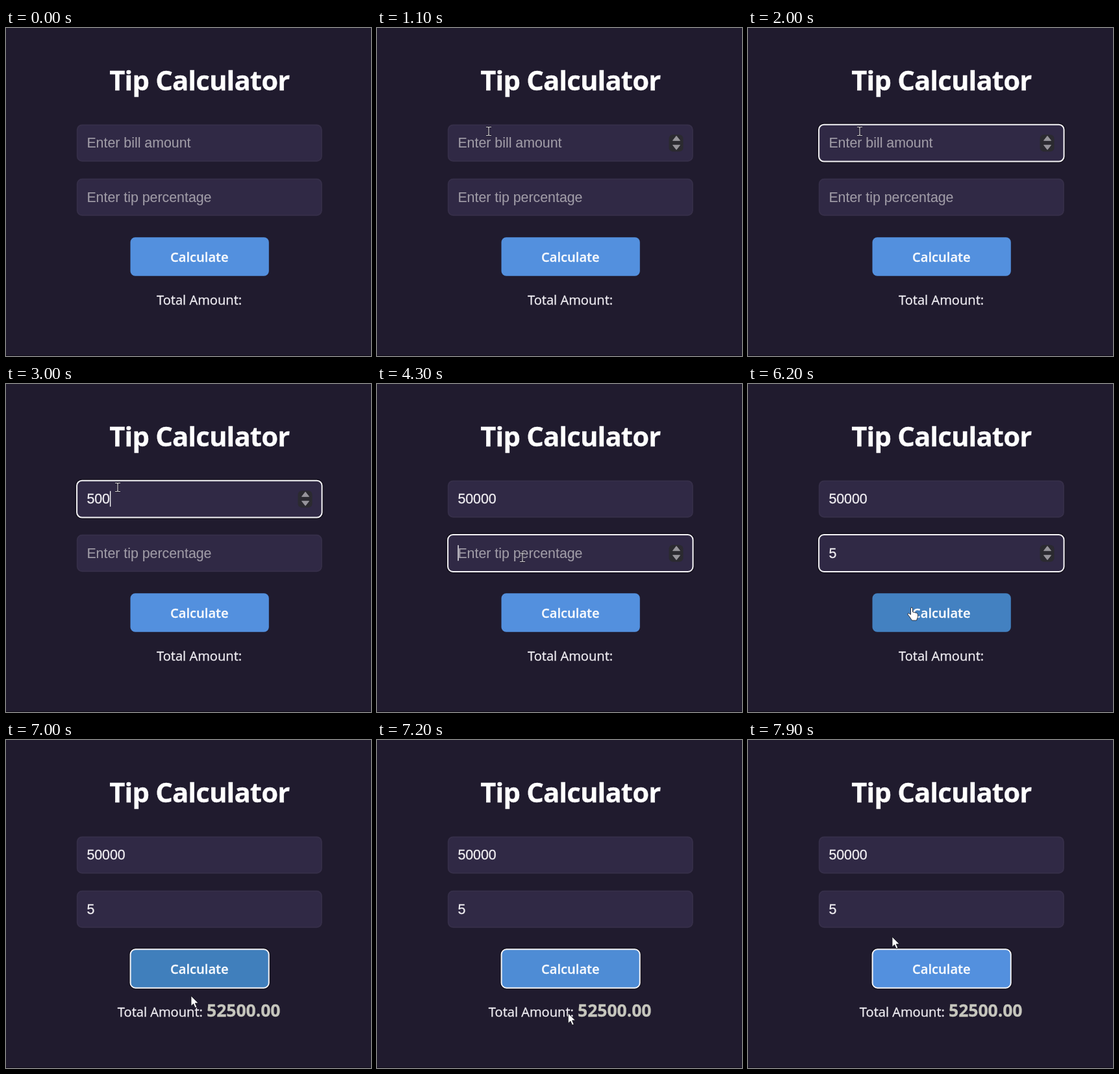
These frames come from a looping animation (562x505 px, 8 s). An HTML page:

```html
<!DOCTYPE html>
<html lang="en">
<head>
<meta charset="utf-8">
<title>Tip Calculator</title>
<style>
  html, body { margin: 0; width: 100%; height: 100%; overflow: hidden; background: #201b2e; }
  svg { display: block; width: 562px; height: 505px; }
  text {
    font-family: "Open Sans", "Noto Sans", sans-serif; white-space: pre;
    color: #fff; fill: currentColor; stroke: currentColor; stroke-width: .3;
  }
  .title { font-size: 41.8px; font-weight: 700; letter-spacing: -.02em; text-anchor: middle; }
  .label { font-size: 20.1px; font-weight: 600; text-anchor: middle; color: #f8fafd; }
  .total { font-size: 20.1px; color: #f0eef3; }
  .amount { font-size: 26.5px; font-weight: 700; color: #c6c6bd; }
  .value { font-family: "Liberation Sans", Arial, sans-serif; font-size: 21.33px; color: #efedf1; }
  .value.empty { color: #a09ca7; stroke-width: .1; }
  .box { fill: #302945; stroke: #362f49; stroke-width: 1.8; }
  .halo { fill: none; stroke: #14111d; stroke-width: 1.6; }
  .ring { fill: none; stroke: #f4f3f6; stroke-width: 2; }
</style>
</head>
<body>
<svg viewBox="0 0 562 505">
  <rect width="562" height="505" fill="#201b2e"/>
  <rect y="504" width="562" height="1" fill="#100d18"/>
  <text class="title" x="297.8" y="96.3">Tip Calculator</text>

  <defs>
    <g id="field"><rect class="box" x="109.7" y=".5" width="376.2" height="55.6" rx="7.5"/></g>
    <g id="focus">
      <rect class="halo" x="107.4" y="-1.8" width="380.8" height="60.2" rx="9.5"/>
      <rect class="ring" x="109.1" y="-.1" width="377.4" height="56.8" rx="7.8"/>
    </g>
    <g id="spinner">
      <rect x="449.5" y="15.5" width="22" height="26" rx="6" fill="#2b2a30"/>
      <path d="M455.5 24.5l5.5-7 5.5 7zM455.5 31.5l5.5 7 5.5-7z" fill="#97959b" stroke="#97959b" stroke-linejoin="round"/>
    </g>
  </defs>

  <g id="bill" transform="translate(0 148.8)"></g>
  <g id="tip" transform="translate(0 232.2)"></g>

  <rect id="button" x="191.5" y="322.2" width="213.3" height="59.6" rx="7.5"/>
  <g id="buttonFocus">
    <rect class="halo" x="189.9" y="320.6" width="216.5" height="62.8" rx="9.5"/>
    <rect class="ring" x="191.6" y="322.3" width="213.1" height="59.4" rx="7.8"/>
  </g>
  <text class="label" x="297.8" y="360">Calculate</text>

  <text class="total" id="total" y="426">Total Amount:</text>
  <text class="amount" id="amount" x="309" y="426">52500.00</text>

  <g id="cursor">
    <g id="beam" fill="none">
      <path d="M-4-6.5h3l1 1 1-1h3M0-5.5v11M-4 6.5h3l1-1 1 1h3" stroke="#17131f" stroke-width="2.6"/>
      <path d="M-4-6.5h3l1 1 1-1h3M0-5.5v11M-4 6.5h3l1-1 1 1h3" stroke="#d5d3d9" stroke-width="1.2"/>
    </g>
    <path id="hand" fill="#fff" stroke="#15151c" stroke-width=".8" stroke-linejoin="round"
      d="M-1.5 1q0-2 1.5-2t1.5 2v5l6 1.5q2 .5 2 3v3l-2 5.5h-7l-4-6-2.5-3q-.5-2 1.5-2l3 2z"/>
    <path id="arrow" fill="#fff" stroke="#15151c" stroke-width=".8" stroke-linejoin="round"
      d="M0 0v15.5l3.6-3.3 2.6 6 2.6-1.1-2.6-5.9 4.8-.2z"/>
  </g>
</svg>

<script>
const LOOP = 8000, STEP = 100, TEXT_X = 124.4;
const $ = id => document.getElementById(id);
const show = (el, on) => { el.style.display = on ? '' : 'none'; };
const clamp = v => Math.max(0, Math.min(1, v));
const mix = (a, b, p) => a + (b - a) * p;

// Pointer positions: [time, x, y]
const path = [
  [100, 300, 137], [500, 245, 147], [1000, 172, 159], [3800, 172, 159],
  [4100, 224, 267], [5800, 224, 267], [6100, 252, 345], [6500, 252, 345],
  [6800, 267, 371], [7000, 285, 394], [7300, 299, 434], [7600, 297, 440],
  [7900, 222, 303]
];
const billTyping = [[2600, '5'], [2800, '50'], [3000, '500'], [3200, '5000'], [3300, '50000']];
const tipTyping = [[5400, '5']];
const BILL_CLICK = 1200, TIP_CLICK = 4200, BUTTON_CLICK = 6500;

function makeField(id, placeholder, typing, focusStart, focusEnd) {
  const group = $(id);
  group.innerHTML = `<use href="#field"/><use href="#focus"/><use href="#spinner"/>
    <text class="value" x="${TEXT_X}" y="35.4"></text>
    <rect y="16" width="1.3" height="24" fill="#fff"/>`;
  const [, ring, spinner, text, caret] = group.children;

  return (t, hovered) => {
    const typed = typing.filter(([time]) => time <= t).pop();
    const value = typed ? typed[1] : '';
    const focused = t >= focusStart && t < focusEnd;
    const lastAction = typed ? typed[0] : focusStart;
    text.textContent = value || placeholder;
    text.classList.toggle('empty', !value);
    show(ring, focused);
    show(spinner, focused || hovered);
    show(caret, focused && (t - lastAction) % 1100 < 550);
    caret.setAttribute('x', TEXT_X + (value ? text.getComputedTextLength() : 0));
  };
}

const drawBill = makeField('bill', 'Enter bill amount', billTyping, BILL_CLICK, TIP_CLICK);
const drawTip = makeField('tip', 'Enter tip percentage', tipTyping, TIP_CLICK, BUTTON_CLICK);

function pointerAt(t) {
  const next = path.findIndex(([time]) => time > t);
  if (next < 0) return path[path.length - 1].slice(1);
  if (next === 0) return null;
  const [t0, x0, y0] = path[next - 1], [t1, x1, y1] = path[next];
  const p = (t - t0) / (t1 - t0);
  return [mix(x0, x1, p), mix(y0, y1, p)];
}

// Button colour fades in and out around the time the pointer is over it.
const hoverLevel = t => clamp((t - 5970) / 300) - clamp((t - 6970) / 300)
  + 0.4 * (clamp((t - 7700) / 100) - clamp((t - 7800) / 100));

function draw(t) {
  const pointer = pointerAt(t);
  const [x, y] = pointer || [-99, -99];
  const inside = (left, top, right, bottom) => x > left && x < right && y > top && y < bottom;
  const onBill = inside(109, 148, 487, 206), onTip = inside(109, 232, 487, 289);
  const onButton = inside(191, 322, 405, 382), onField = onBill || onTip;

  drawBill(t, onBill);
  drawTip(t, onTip);

  const level = hoverLevel(t);
  const rgb = [mix(83, 62, level), mix(144, 125, level), mix(222, 184, level)].map(Math.round);
  $('button').setAttribute('fill', `rgb(${rgb})`);

  const done = t >= BUTTON_CLICK;
  show($('buttonFocus'), done);
  show($('amount'), done);
  $('total').setAttribute('x', done ? 171.8 : 232);

  show($('cursor'), pointer);
  $('cursor').setAttribute('transform', `translate(${x} ${y})`);
  show($('beam'), onField);
  show($('hand'), onButton);
  show($('arrow'), !onField && !onButton);
}

const start = performance.now();
function tick() {
  const elapsed = (performance.now() - start) % LOOP;
  draw(Math.floor(elapsed / STEP) * STEP);
  requestAnimationFrame(tick);
}
tick();
</script>
</body>
</html>
```
